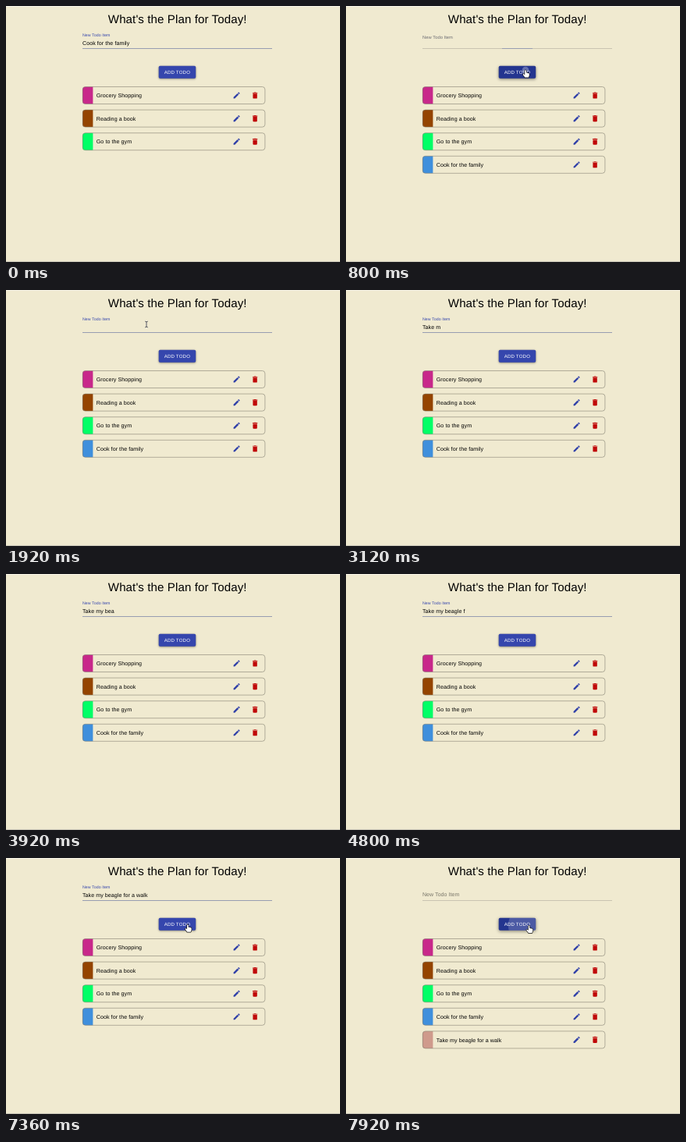
An HTML page with a canvas that plays this animation: 428 by 328 pixels, repeating every 8 s.

```html
<!DOCTYPE html>
<html lang="en">
<head>
<meta charset="utf-8">
<title>Todo list</title>
<style>
html, body { margin: 0; width: 100%; height: 100%; overflow: hidden; background: #f0ead0; }
canvas { display: block; width: 428px; height: 328px; }
</style>
</head>
<body>
<canvas id="stage"></canvas>
<script>
const W = 428, H = 328, LOOP = 8000, STEP = 80;
const canvas = document.getElementById('stage');
const ctx = canvas.getContext('2d');
const dpr = window.devicePixelRatio || 1;
canvas.width = W * dpr;
canvas.height = H * dpr;

const FONT = '"Liberation Sans", Arial, sans-serif';
const BLUE = [53, 70, 173], DARK = [36, 53, 143], GREY = [120, 117, 104];
const TODOS = [
  ['Grocery Shopping', '#c8288a'],
  ['Reading a book', '#944400'],
  ['Go to the gym', '#00ff66'],
  ['Cook for the family', '#3f8fdc'],
  ['Take my beagle for a walk', '#cf9a8c']
];
const PENCIL = new Path2D('M3 17.25V21h3.75L17.81 9.94l-3.75-3.75L3 17.25zM20.71 7.04c.39-.39.39-1.02 0-1.41l-2.34-2.34c-.39-.39-1.02-.39-1.41 0l-1.83 1.83 3.75 3.75 1.83-1.83z');
const BIN = new Path2D('M6 19c0 1.1.9 2 2 2h8c1.1 0 2-.9 2-2V7H6v12zM19 4h-3.5l-1-1h-5l-1 1H5v2h14V4z');
const ARROW = new Path2D('M0 0V8.2L1.9 6.5 3.2 9.4 4.5 8.8 3.2 6H5.8Z');
const HAND = new Path2D('M-.8 .8Q0-.6 .8 .8V3.6Q1.6 3 2.2 3.9 3 3.3 3.6 4.2 4.6 3.8 4.8 5V7L3.9 9.6H-.6L-3.2 6.2Q-3.4 4.8-2 5.2L-.8 6.2Z');

// Moments of the story, in ms
const press = [700, 7690], release = [781, 7715], focusAt = 1450;
const typeStart = 2225, typeGap = 169;
const hoverIn = [560, 7350], hoverOut = 1040;
const path = [
  [80, 180, 46], [620, 230, 82], [900, 230, 82], [1400, 180, 44],
  [6800, 180, 44], [7520, 234.5, 86.5], [8000, 234.5, 86.5]
];

const clamp = v => Math.max(0, Math.min(1, v));
const mix = (a, b, p) => a + (b - a) * p;
const blend = (a, b, p) => `rgb(${a.map((v, i) => Math.round(mix(v, b[i], p)))})`;

function bezier(x1, y1, x2, y2) {
  const at = (a, b, u) => 3 * a * u * (1 - u) ** 2 + 3 * b * u * u * (1 - u) + u ** 3;
  return x => {
    let lo = 0, hi = 1;
    for (let i = 0; i < 24; i++) {
      const u = (lo + hi) / 2;
      if (at(x1, x2, u) < x) lo = u; else hi = u;
    }
    return at(y1, y2, hi);
  };
}
const easeOut = bezier(0, 0, 0.2, 1);
const easeInOut = bezier(0.4, 0, 0.2, 1);
const ramp = (t, start, length, ease = easeOut) => ease(clamp((t - start) / length));

// One for on, falling at `off`, rising at `on`, falling at `off2`
function onOff(t, off, on, off2) {
  if (t < on) return 1 - ramp(t, off, 200);
  return ramp(t, on, 200) - ramp(t, off2, 200);
}

function text(str, x, y, size, color, spacing = 0, align = 'left') {
  ctx.font = `${size}px ${FONT}`;
  ctx.letterSpacing = `${spacing}px`;
  ctx.textAlign = align;
  ctx.fillStyle = color;
  ctx.fillText(str, x, y);
}

function box(x, y, w, h, r) {
  ctx.beginPath();
  ctx.roundRect(x, y, w, h, r);
}

function icon(shape, cx, cy, color) {
  ctx.save();
  ctx.translate(cx - 5.4, cy - 5.4);
  ctx.scale(0.45, 0.45);
  ctx.fillStyle = color;
  ctx.fill(shape);
  ctx.restore();
}

function drawTodo([name, color], i) {
  const y = 103.5 + i * 29.6, mid = y + 11;
  ctx.fillStyle = color;
  box(98, y, 13.4, 22, [3.5, 0, 0, 3.5]);
  ctx.fill();
  ctx.strokeStyle = '#858272';
  ctx.lineWidth = 0.6;
  box(98.3, y, 233.6, 22, 3.5);
  ctx.stroke();
  text(name, 115.8, mid + 2.6, 7.08, '#000', 0.066);
  icon(PENCIL, 295.6, mid, '#3040a8');
  icon(BIN, 319.1, mid, '#c00808');
}

function inputText(t) {
  if (t < release[0]) return TODOS[3][0];
  if (t < typeStart || t >= release[1]) return '';
  return TODOS[4][0].slice(0, Math.floor((t - typeStart) / typeGap) + 1);
}

function drawField(t) {
  const focus = onOff(t, press[0], focusAt, press[1]);
  const small = onOff(t, release[0], focusAt, release[1]);
  const size = mix(7, 5.25, small);
  text('New Todo Item', 98, mix(49.2, 38.8, small), size, blend(GREY, BLUE, focus), size * 0.009);
  text(inputText(t), 98, 49.8, 7.08, '#000', 0.066);
  ctx.fillStyle = '#b9b5a4';
  ctx.fillRect(98, 54, 243, 0.7);
  ctx.fillStyle = '#9399b2';
  ctx.fillRect(219.5 - 121.5 * focus, 54, 243 * focus, 0.9);
}

function drawButton(t) {
  const hover = ramp(t, hoverIn[0], 250, easeInOut) - ramp(t, hoverOut, 250, easeInOut)
    + ramp(t, hoverIn[1], 250, easeInOut);
  ctx.save();
  ctx.shadowColor = 'rgba(0,0,0,.45)';
  ctx.shadowBlur = mix(2.5, 4, hover) * dpr;
  ctx.shadowOffsetY = mix(0.9, 1.3, hover) * dpr;
  ctx.fillStyle = blend(BLUE, DARK, hover);
  box(195.7, 76.7, 47.5, 16, 1.8);
  ctx.fill();
  ctx.restore();

  press.forEach((start, i) => {
    const grow = ramp(t, start, 550, easeInOut);
    const fade = ramp(t, release[i], 550, easeInOut);
    if (grow <= 0 || fade >= 1) return;
    ctx.save();
    box(195.7, 76.7, 47.5, 16, 1.8);
    ctx.clip();
    ctx.fillStyle = `rgba(255,255,255,${0.3 * (1 - fade * 0.7) * (1 - (fade > 0.95))})`;
    ctx.beginPath();
    ctx.arc(i ? 234.5 : 230, i ? 86.5 : 82, 41 * grow, 0, 7);
    ctx.fill();
    ctx.restore();
  });
  text('ADD TODO', 202.7, 86.9, 6.12, '#fff', 0.17);
}

function cursorAt(t) {
  const k = path.findIndex(p => p[0] > t);
  const [t0, x0, y0] = path[k - 1], [t1, x1, y1] = path[k];
  const p = easeInOut(clamp((t - t0) / (t1 - t0)));
  return [mix(x0, x1, p), mix(y0, y1, p)];
}

function drawCursor(t) {
  if (t < 80 || (t >= typeStart && t < 6800)) return;
  const [x, y] = cursorAt(t);
  ctx.save();
  ctx.translate(x, y);
  ctx.lineJoin = 'round';
  if (y < 55) {
    const beam = new Path2D('M-1.8-3.8Q0-3.8 0-2.6V2.6Q0 3.8-1.8 3.8M1.8-3.8Q0-3.8 0-2.6M0 2.6Q0 3.8 1.8 3.8');
    ctx.strokeStyle = 'rgba(255,255,255,.7)';
    ctx.lineWidth = 1.8;
    ctx.stroke(beam);
    ctx.strokeStyle = '#222';
    ctx.lineWidth = 0.8;
    ctx.stroke(beam);
  } else {
    const hand = x > 195.7 && y > 76.7;
    const shape = hand ? HAND : ARROW;
    ctx.lineWidth = 1.3;
    ctx.strokeStyle = hand ? '#111' : '#fff';
    ctx.stroke(shape);
    ctx.fillStyle = hand ? '#fff' : '#111';
    ctx.fill(shape);
  }
  ctx.restore();
}

function draw(t) {
  ctx.setTransform(dpr, 0, 0, dpr, 0, 0);
  ctx.textRendering = 'geometricPrecision';
  ctx.fillStyle = '#f0ead0';
  ctx.fillRect(0, 0, W, H);
  ctx.fillStyle = '#f6f3e6';
  ctx.fillRect(0, 0, W, 1);
  ctx.fillStyle = '#c6c3b6';
  ctx.fillRect(0, H - 1, W, 1);

  text("What's the Plan for Today!", 219.7, 22.4, 15.05, '#000', 0.11, 'center');
  drawField(t);
  drawButton(t);
  const count = 3 + release.filter(r => t >= r).length;
  TODOS.slice(0, count).forEach(drawTodo);
  drawCursor(t);
}

let origin = null;
function tick(now) {
  if (origin === null) origin = now;
  const t = (now - origin) % LOOP;
  draw(Math.min(Math.floor((t + 1) / STEP) * STEP, LOOP - STEP));
  requestAnimationFrame(tick);
}
requestAnimationFrame(tick);
</script>
</body>
</html>
```
